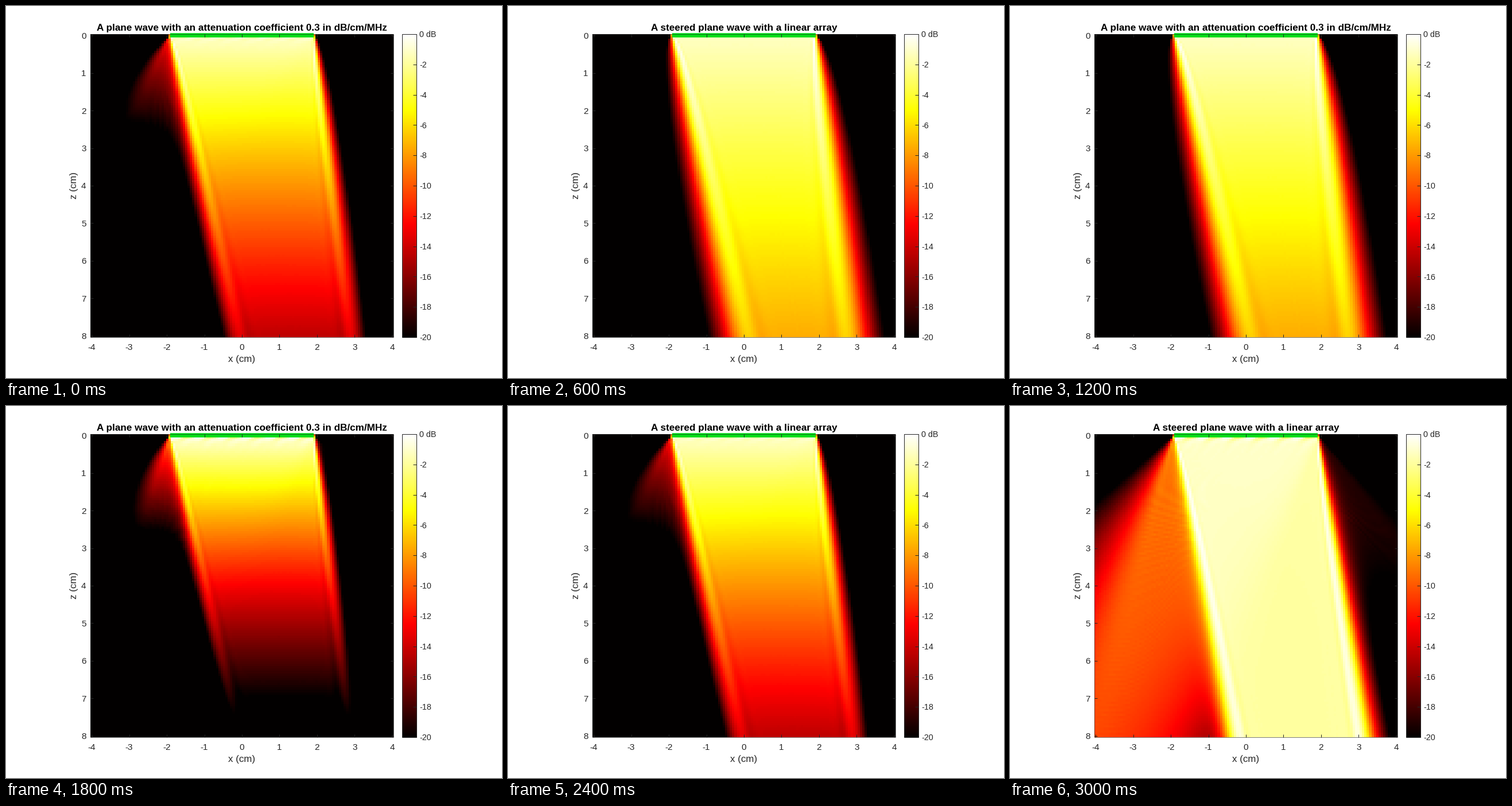
Write a matplotlib script that moves like this. It is 864x648 px and loops after 3.6 s.

```python
import numpy as np
import matplotlib.pyplot as plt
from matplotlib.animation import FuncAnimation
from matplotlib.colors import ListedColormap
from matplotlib.patches import Rectangle

W, H, DPI = 864, 648, 100
PT = 72 / DPI                      # points per pixel
GRID = 128                         # cells per side of the map
LEFT, TOP, SIDE = 147, 49, 528
CELL = SIDE / GRID
SCALE = CELL * (GRID - 1) / 8      # pixels per cm
BAR_L, BAR_R = 690, 714.5
INK = "#262626"
FLOOR = -20

# Linear array, lengths in cm and frequencies in MHz
SPEED = 0.154
PITCH, ELEMENTS = 0.03, 128
TILT = np.sin(np.radians(10))


def px(x):
    return LEFT + CELL / 2 + (x + 4) * SCALE


def py(z):
    return TOP + CELL / 2 + z * SCALE


def bar_y(db):
    return TOP + SIDE * db / FLOOR


def hot_map():
    i = np.arange(1, 257)
    ramps = (i / 96, (i - 96) / 96, (i - 192) / 64)
    return ListedColormap(np.clip(np.stack(ramps, 1), 0, 1))


def beam(fc, width, alpha, head):
    """Level in dB of a steered pulse, summed over its plane-wave spectrum."""
    step = 8 / (GRID - 1)
    span = 3 * GRID                # periodic width, in cells
    power = np.zeros((GRID, GRID))
    ref = 0
    for f in fc * np.linspace(0.35, 1.6, 136):
        off = f / fc - 1
        probe = np.exp(-np.log(2) * (abs(off) / 0.385) ** 3)
        weight = np.sinc(off) ** 2 * probe * fc / f
        k = 2 * np.pi * f / SPEED
        dk = 2 * np.pi / (span * step)
        half = span * int(np.ceil(k / dk / span))
        kx = dk * np.arange(-half, half)
        s = kx / k
        live = abs(s) < 0.92       # steeper waves would wrap around
        cos = np.sqrt(np.clip(1 - s * s, 0.01, 1))

        phase = (kx - k * TILT) * PITCH / 2 + 1e-9
        array = np.sin(ELEMENTS * phase) / np.sin(phase)
        source = array * np.sinc(kx * width / (2 * np.pi)) * PITCH / (span * step)
        loss = alpha * f / 8.686

        waves = np.empty((GRID, kx.size), np.complex64)
        waves[0] = live * source * np.exp(-4j * kx)
        waves[1:] = live * np.exp((1j * k * cos - loss / cos) * step)
        waves = np.cumprod(waves, axis=0)
        folded = waves.reshape(GRID, -1, span).sum(1)
        p = np.fft.ifft(folded, axis=1, norm="forward")[:, :GRID]
        power += weight * abs(p) ** 2
        ref += weight * np.sinc(width * TILT * f / SPEED) ** 2
    return 10 * np.log10(power / ref + 1e-9) - head


low = beam(2.72, 0.027, 0.315, 1.2)
mid = beam(5.9, 0.0295, 0.325, 1.3)
high = beam(7.6, 0.029, 0.436, 1.3)
lossless = beam(7.9, 0.028, 0.0, 1.9)

LOSSY = "A plane wave with an attenuation coefficient 0.3 in dB/cm/MHz"
STEERED = "A steered plane wave with a linear array"
SCENES = [(mid, LOSSY), (low, STEERED), (low, LOSSY),
          (high, LOSSY), (mid, STEERED), (lossless, STEERED)]

plt.rcParams["font.family"] = "Liberation Sans"
fig = plt.figure(figsize=(W / DPI, H / DPI), dpi=DPI, facecolor="white")
ax = fig.add_axes([0, 0, 1, 1])
ax.axis("off")


def text(x, y, s, size, **kw):
    style = dict(color=INK, va="baseline")
    return ax.text(x, y, s, fontsize=size * PT, **{**style, **kw})


def line(x, y, **kw):
    style = dict(color=INK, lw=PT, solid_capstyle="butt", zorder=4)
    ax.plot(x, y, **{**style, **kw})


def frame(x, y, w, h, **kw):
    ax.add_patch(Rectangle((x, y), w, h, fill=False, ec=INK, lw=PT, zorder=4, **kw))


def picture(data, l, r):
    return ax.imshow(data, cmap=hot_map(), vmin=FLOOR, vmax=0, aspect="auto",
                     interpolation="nearest",
                     extent=(l, r, TOP + SIDE, TOP), zorder=1)


field = picture(SCENES[0][0], LEFT, LEFT + SIDE)
picture(np.linspace(0, FLOOR, 256)[:, None], BAR_L, BAR_R)
frame(LEFT, TOP, SIDE, SIDE, alpha=0.6)
frame(BAR_L, TOP, BAR_R - BAR_L, SIDE)

edge = PITCH * (ELEMENTS - 1) / 2
line([px(-edge), px(edge)], [py(0)] * 2, color="#02de17", lw=7.5 * PT, zorder=3)

TICK = 5.3
right, bottom = LEFT + SIDE, TOP + SIDE
for v in range(9):
    x, y = px(v - 4), py(v)
    line([x, x], [bottom, bottom - TICK])
    line([x, x], [TOP, TOP + TICK])
    line([LEFT, LEFT + TICK], [y, y])
    line([right, right - TICK], [y, y])
    text(x, 598.8, str(v - 4), 15.4, ha="center")
    text(139.5, y + 5.5, str(v), 15.4, ha="right")

for db in range(FLOOR, 1, 2):
    y = bar_y(db)
    line([BAR_R - TICK, BAR_R], [y, y])
    text(720.5, y + 5.2, str(db) if db else "0 dB", 14.4, ha="left")

text(411, 620, "x (cm)", 16.9, ha="center")
text(126.5, 313, "z (cm)", 16.9, ha="right", va="center", rotation=90)
title = text(411, 42.8, "", 17.15, ha="center", weight="bold", color="black")

ax.set_xlim(0, W)
ax.set_ylim(H, 0)


def draw(i):
    data, label = SCENES[i]
    field.set_data(data)
    title.set_text(label)
    return field, title


anim = FuncAnimation(fig, draw, frames=len(SCENES), interval=600,
                     repeat=True, repeat_delay=0, blit=False)
plt.show()
```
